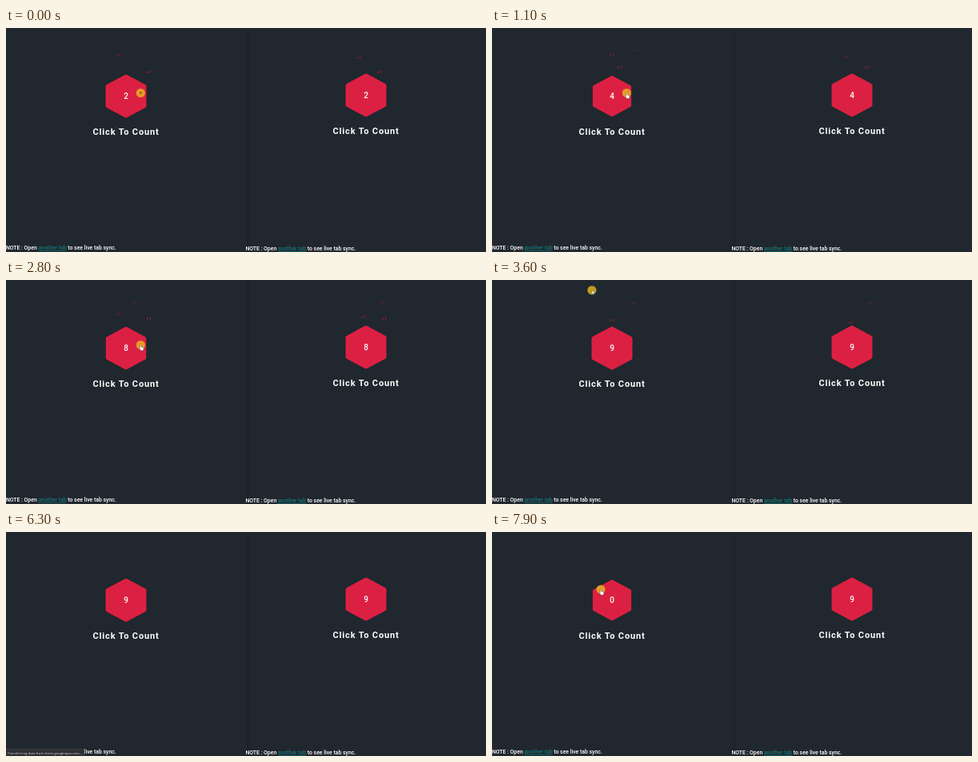
Write an HTML page that moves like this. It is 600 by 281 pixels and loops after 8 s.

```html
<!DOCTYPE html>
<html lang="en">
<head>
<meta charset="utf-8">
<title>Click To Count</title>
<style>
  html, body { margin: 0; width: 100%; height: 100%; overflow: hidden; background: #20272e; }
  svg { display: block; width: 100vw; height: 100vh; }
  text { font-family: Roboto, "Liberation Sans", sans-serif; font-weight: 500; fill: #fff; white-space: pre; }
  .mid { text-anchor: middle; }
  .hex { fill: #dc2043; stroke: #dc2043; stroke-width: 5; stroke-linejoin: round; }
  .count { font-size: 10px; }
  .title { font-size: 11px; font-weight: 700; letter-spacing: .85px; }
  .note { font-size: 6.87px; }
  .link { fill: #127576; text-decoration: underline; }
  .plus { font-size: 5.6px; letter-spacing: .6px; fill: #dc2043; }
  .status { font: 4.35px "Open Sans", "Noto Sans", sans-serif; fill: #d5d6d8; }
</style>
</head>
<body>
<svg viewBox="0 0 600 281" preserveAspectRatio="none">
  <rect width="600" height="281" fill="#20272e"/>
  <rect x="300" width="4" height="281" fill="#1d242b"/>
  <g id="panes"></g>
  <g id="status">
    <rect x="-1" y="272.5" width="99" height="10" rx="1" fill="#2d2f33" stroke="#4a4c50" stroke-width=".6"/>
    <text class="status" x="1.8" y="278.6">Transferring data from fonts.googleapis.com...</text>
  </g>
  <g id="cursor">
    <circle r="5.6" fill="#ebbc20" fill-opacity=".78"/>
    <circle id="press" r="1.4" fill="#a8582a"/>
    <path id="hand" d="M-.6 .2q.8-.8 1.4 0v2.3l2.4 .6q.7 .3 .6 1.1l-.5 2.9h-3l-2-2.7q0-.9 .7-.7l.4 .4z" fill="#fff" stroke="#333" stroke-width=".35"/>
    <path id="arrow" d="M0 0v5l1.2-1 .9 1.9 .9-.4-.9-1.8h1.6z" fill="#fff" stroke="#333" stroke-width=".35"/>
  </g>
</svg>
<script>
const LOOP = 8000, CLICKS = 9, FIRST = -505, GAP = 455, RELOAD = 6400;
const LIFE = 2000, RISE = 0.0245;
const $ = id => document.getElementById(id);
const clamp = v => Math.min(1, Math.max(0, v));
const mix = (a, b, k) => a + (b - a) * k;

// the "+1"s alternate between a left and a right lane and sway within it
function startOf(i, side) {
  const odd = i % 2;
  const sway = Math.cos((i - 1) * Math.PI / 3 - (odd ? 0 : 0.8));
  const x = side ? 441 + i + 25 * odd : odd ? 166 + 12.5 * sway : 143 + 8 * sway;
  const y = odd ? 57 - 0.8 * i : 46 + 1.9 * i + 3 * side;
  return [x, y];
}

function pane(cx, cy, noteX, noteY) {
  return `<g transform="translate(${cx} ${cy})">
    <path class="hex" d="M0-24.6 23-12.2V12.2L0 24.6-23 12.2V-12.2z"/>
    <text class="mid count" y="3.6"></text>
    <text class="mid title" y="48.8">Click To Count</text>
  </g>
  <text class="note" x="${noteX}" y="${noteY}">NOTE : Open <tspan class="link">another tab</tspan> to see live tab sync.</text>`;
}
$("panes").innerHTML = pane(150, 85.5, 0, 278) + pane(450, 84.3, 299.5, 279) +
  '<text class="mid plus">+1</text>'.repeat(2 * CLICKS);
const hex = document.querySelector(".hex");
const counts = document.querySelectorAll(".count");
const pluses = document.querySelectorAll(".plus");

const show = (el, on) => el.setAttribute("display", on ? "inline" : "none");

function drawPlus(el, n, t) {
  const i = n >> 1, age = t - FIRST - i * GAP;
  const live = age >= 0 && age < LIFE;
  show(el, live);
  if (!live) return;
  const [x, y] = startOf(i, n % 2);
  el.setAttribute("x", x);
  el.setAttribute("y", y - age * RISE + 2);
  el.setAttribute("opacity", 0.85 * (1 - age / LIFE) ** 1.2);
}

function draw(t) {
  const done = Math.min(CLICKS, Math.floor((t - FIRST) / GAP) + 1);
  counts[0].textContent = t < RELOAD ? done : 0;
  counts[1].textContent = done;
  pluses.forEach((el, n) => drawPlus(el, n, t));

  // hovering shrinks the button, pressing restores it
  const sinceClick = t - FIRST - (done - 1) * GAP;
  const leaving = t < 5000;
  const hover = leaving ? 1 - clamp((t - 3260) / 120) : clamp((t - 7150) / 120);
  const scale = 1 - 0.055 * hover * clamp((sinceClick - 100) / 100);
  hex.setAttribute("transform", `scale(${scale})`);

  // the pointer flies off over the top edge and comes back after the reload
  const out = Math.max(0, (t - 3200) / 400), back = clamp((t - 6700) / 450);
  const x = leaving ? mix(168.3, 125, out) : mix(108, 136, back);
  const y = leaving ? mix(81.5, 13, out) : mix(27, 72, back);
  const over = hover > 0.5, pressed = sinceClick < 110;
  $("cursor").setAttribute("transform", `translate(${x} ${y})`);
  show($("cursor"), leaving || back > 0);
  show($("press"), pressed);
  show($("hand"), over && !pressed);
  show($("arrow"), !over);

  show($("status"), t >= 5600 && t < RELOAD);
}

function tick(now) {
  draw(now % LOOP);
  requestAnimationFrame(tick);
}
draw(0);
requestAnimationFrame(tick);
</script>
</body>
</html>
```
